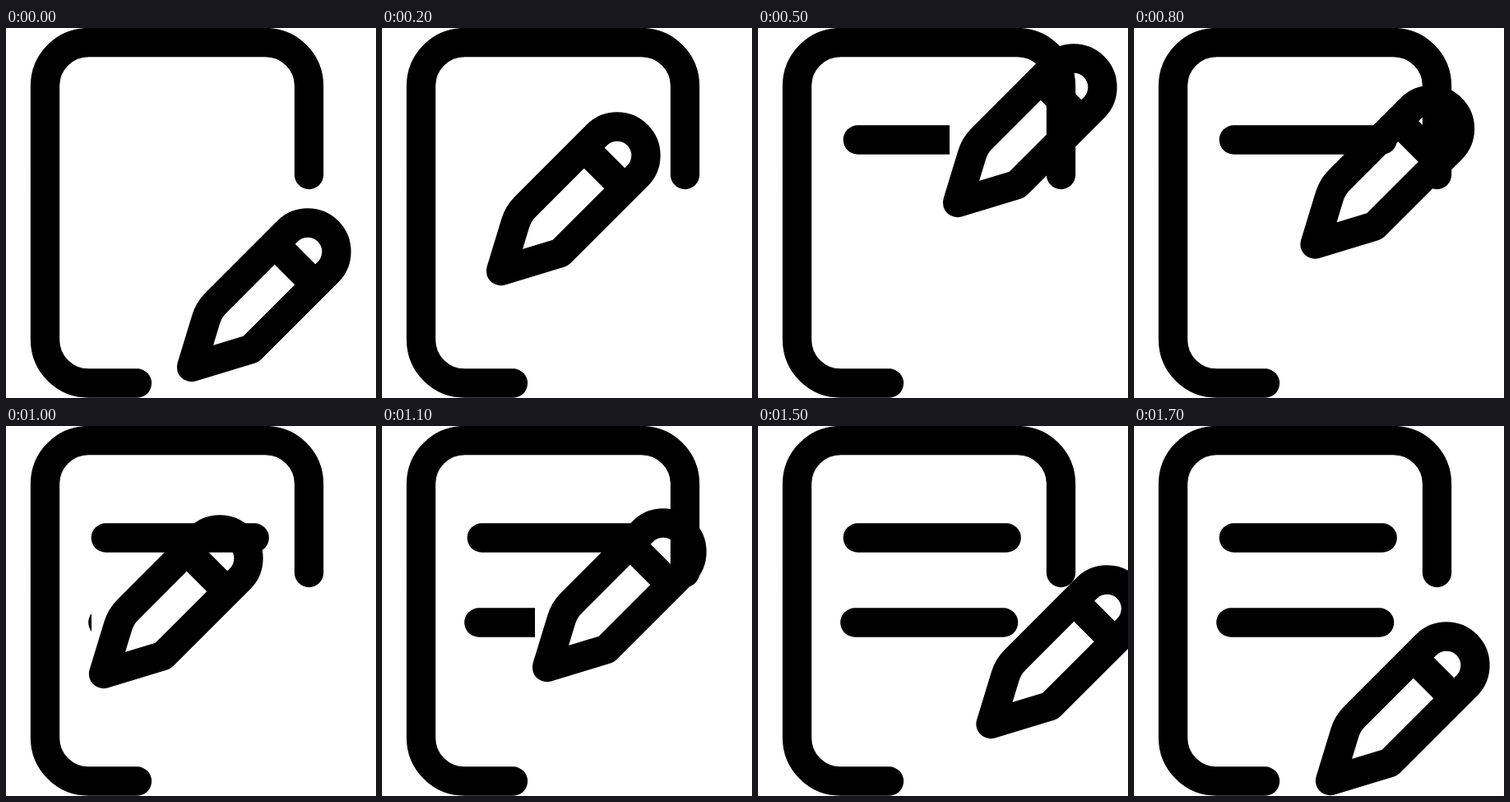
Animation of 450 by 450 pixels, one loop 2000 ms. Source, as an HTML page:

```html
<!DOCTYPE html>
<html lang="en">
<head>
<meta charset="utf-8">
<title>Writing pencil</title>
<style>
  html, body { margin: 0; height: 100%; overflow: hidden; background: #fff; }
  svg { display: block; width: 100%; height: 100%; }
  path { fill: none; stroke: #000; stroke-width: 35.3; stroke-linecap: round; stroke-linejoin: round; }
</style>
</head>
<body>
<svg viewBox="0 0 450 450">
  <clipPath id="clip1"><rect id="wipe1" y="100" height="70"/></clipPath>
  <clipPath id="clip2"><rect id="wipe2" y="200" height="70"/></clipPath>
  <path d="M368.5 178.5V70.5A53 53 0 0 0 315.5 17.5H100.5A53 53 0 0 0 47.5 70.5V379A53 53 0 0 0 100.5 432H159.5"/>
  <path clip-path="url(#clip1)" d="M121.3 136H302.2"/>
  <path clip-path="url(#clip2)" d="M117.8 239H298.6"/>
  <path id="pencil" d="M225.5 412.5L243.2 354.4Q246.6 342.9 255.1 334.4L342.25 247.25A35 35 0 0 1 391.75 296.75L297.9 390.5ZM326.75 262.75L376.25 312.25"/>
</svg>
<script>
const LOOP = 2000, STEP = 100, FULL = 450;

// Pencil offset from rest: [ms, x, y]
const keys = [
  [0, 0, 0], [200, -81, -117], [300, -103, -168], [400, -76, -200],
  [600, 110, -200], [800, -5.5, -149.5], [900, -62, -126], [1000, -107, -111],
  [1100, -25, -119], [1200, 96, -127], [1300, 102, -119], [1700, 13, 19]
];

const byId = id => document.getElementById(id);
const pencil = byId('pencil'), wipe1 = byId('wipe1'), wipe2 = byId('wipe2');

function pencilAt(t) {
  const next = keys.findIndex(k => k[0] > t);
  if (next < 0) return keys.at(-1).slice(1);
  const [t0, x0, y0] = keys[next - 1], [t1, x1, y1] = keys[next];
  const p = (t - t0) / (t1 - t0);
  return [x0 + (x1 - x0) * p, y0 + (y1 - y0) * p];
}

// The line follows the pencil between start and end, then stays whole
function reveal(rect, t, start, end, edge) {
  rect.setAttribute('width', t < start ? 0 : t > end ? FULL : edge);
}

function draw(now) {
  const t = Math.floor((now % LOOP) / STEP) * STEP;
  const [x, y] = pencilAt(t);
  pencil.setAttribute('transform', `translate(${x} ${y})`);
  reveal(wipe1, t, 300, 600, x + 216);
  reveal(wipe2, t, 1000, 1200, x + 211);
}

const begin = performance.now();
function tick() {
  draw(performance.now() - begin);
  requestAnimationFrame(tick);
}
tick();
</script>
</body>
</html>
```
